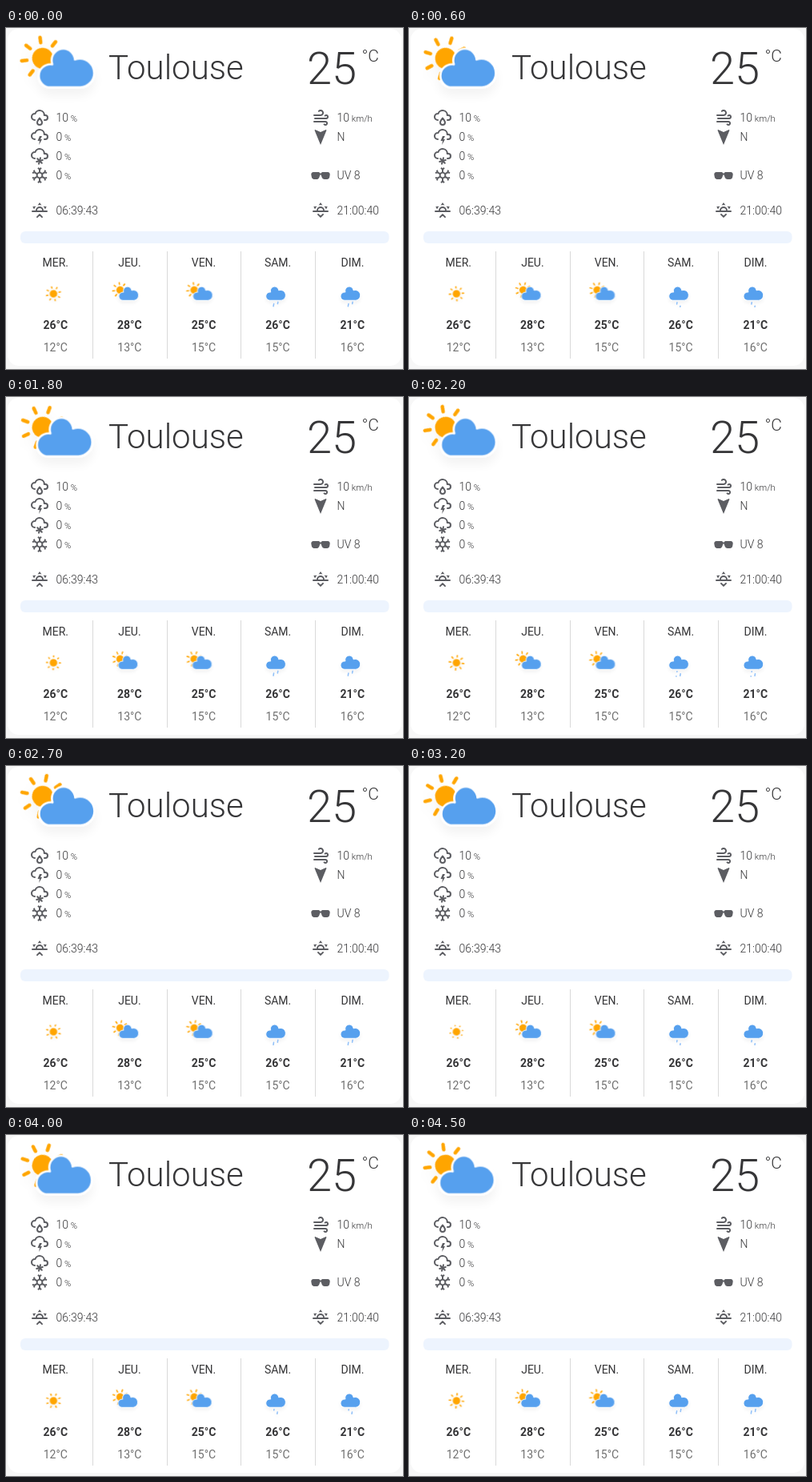
Recreate the animation shown at these times as an HTML page. Size 496x426 px, loop 4600 ms.

```html
<!DOCTYPE html>
<html lang="fr">
<head>
<meta charset="utf-8">
<title>Météo</title>
<style>
html, body { margin: 0; width: 100%; height: 100%; overflow: hidden; background: #f7f7f7; }
svg { display: block; }
text { font-family: Roboto, "Open Sans", sans-serif; font-size: 14px; font-weight: 300; fill: #363638; }
.unit { font-size: 11.2px; }
.city { font-size: 42px; }
.now { font-size: 56px; }
.deg { font-size: 21px; }
.mid { text-anchor: middle; }
.end { text-anchor: end; }
.day { font-weight: 400; }
.high { font-weight: 700; }
.low { font-weight: 400; fill: #707070; }
.fill { fill: #5c5d62; }
.line { fill: none; stroke: #5c5d62; stroke-width: 2; stroke-linecap: round; stroke-linejoin: round; }
.butt { stroke-linecap: butt; stroke-linejoin: miter; }
.ray { stroke: orange; stroke-width: 2; stroke-linecap: round; }
.rain { stroke: #91c0f8; stroke-width: 2; stroke-linecap: round; stroke-dasharray: 4 7; }
</style>
</head>
<body>
<svg id="stage" width="496" height="426" viewBox="0 0 496 426">
  <defs>
    <filter id="soft" width="200%" height="200%">
      <feGaussianBlur in="SourceAlpha" stdDeviation="3"/>
      <feOffset dy="4"/>
      <feComponentTransfer><feFuncA type="linear" slope="0.05"/></feComponentTransfer>
      <feMerge><feMergeNode/><feMergeNode in="SourceGraphic"/></feMerge>
    </filter>
  </defs>
  <rect x="2" y="1" width="492" height="421" rx="14" fill="#fff"/>
  <rect x="18" y="254" width="460.5" height="15" rx="6" fill="#edf4fe"/>
</svg>
<script>
const LOOP = 4600, STEP = 100;
const CLOCK = 43700; // how long the icons have already been running at the loop start
const stage = document.getElementById('stage');
const add = markup => stage.insertAdjacentHTML('beforeend', markup);
const text = (x, y, str, cls = '') => add(`<text x="${x}" y="${y}" class="${cls}">${str}</text>`);

// Line icons on a 24px grid
const line = (d, cls = '') => `<path class="line ${cls}" d="${d}"/>`;
const fill = d => `<path class="fill" fill-rule="evenodd" d="${d}"/>`;
const spin = (part, cx, cy) => Array.from({ length: 6 }, (_, i) =>
  `<g transform="rotate(${i * 60} ${cx} ${cy})">${part}</g>`).join('');

const outline = line('M6 15a4 4 0 0 1 0-8h.5A5.8 5.8 0 0 1 17.8 9H19a3 3 0 0 1 0 6h-1');
const horizon = fill('M3 12H7A5 5 0 0 1 17 12H21A1 1 0 0 1 21 14H3A1 1 0 0 1 3 12M15 12A3 3 0 0 0 9 12H15' +
  'M12 2L14.4 5.4Q12 4.6 9.6 5.4ZM3.3 7L7.5 6.65Q5.5 8.4 5.1 10.8ZM20.7 7L18.9 10.8Q18.5 8.4 16.5 6.65Z');

const glyphs = {
  rain: outline + line('M12 12.6C10.5 14.4 9 16.6 9 18a3 3 0 0 0 6 0C15 16.6 13.5 14.4 12 12.6Z'),
  bolt: outline + fill('M12 11H15L13 15H15L11.25 22L12 17H9.5Z'),
  snow: outline + spin(line('M12 18L13 14.2'), 12, 18),
  flake: spin(line('M10 2.7L12 4.7L14 2.7M12 4.7V8.25L15.25 10.12', 'butt'), 12, 12),
  wind: line('M4 9h8a3 3 0 1 0-2.1-5.1M5 13h14a2 2 0 1 0-1.4-3.4M4 17h14a2 2 0 1 1-1.4 3.4'),
  arrow: fill('M12 22L4.5 3.7L5.2 3L12 6L18.8 3L19.5 3.7Z'),
  glasses: fill('M7 17H4C2.4 17 1 15.7.8 14.1L.3 11.2C0 9.4 1.3 8 3 8H9C10.2 8 11 8.6 11.35 9.45' +
    'Q12 9.3 12.65 9.45C13 8.6 13.8 8 15 8H21C22.7 8 24 9.4 23.7 11.2L23.2 14.2' +
    'C23 15.7 21.6 17 20 17H17C15.4 17 13.9 15.8 13.5 14.3L12.65 11.6Q12 11.2 11.35 11.6L10.4 14.4C10 15.8 8.6 17 7 17Z'),
  rise: horizon + line('M9 20.1L12 17.1L15 20.1'),
  set: horizon + line('M9 16.9L12 19.9L15 16.9')
};
const glyph = (x, cy, name) => add(`<g transform="translate(${x} ${cy - 12})">${glyphs[name]}</g>`);

// Weather icons on a 64px grid
const rays = Array.from({ length: 8 }, (_, i) =>
  `<line class="ray" y1="9" y2="12" transform="rotate(${i * 45})"/>`).join('');
const sun = cls => `<g class="${cls}">${rays}<circle r="6" fill="orange"/></g>`;
const cloud = `<path transform="translate(0 -1)" fill="#57a0ee" stroke="#fff" stroke-width="1.2" stroke-linejoin="round"
  d="M47.7 35.4c0-4.6-3.7-8.2-8.2-8.2c-1 0-1.9.2-2.8.5c-.3-3.4-3.1-6.2-6.6-6.2c-3.7 0-6.7 3-6.7 6.7
  c0 .8.2 1.6.4 2.3c-.3-.1-.7-.1-1-.1c-3.7 0-6.7 2.9-6.7 6.6c0 3.6 2.9 6.6 6.5 6.6l17.2 0C44.2 43.3 47.7 39.8 47.7 35.4z"/>`;
const drop = (x, y, cls) => `<line class="rain ${cls}" transform="translate(${x} ${y})" y2="8"/>`;

const weather = {
  clear: `<g transform="translate(32 32)">${sun('shiny')}</g>`,
  cloudy: `<g transform="translate(20 26)">${sun('steady')}</g><g class="drift">${cloud}</g>`,
  rainy: `${cloud}<g transform="translate(35.3 46) rotate(10)">${drop(-6, 1, 'early')}${drop(0, -1, 'late')}</g>`
};
const icon = (x, y, size, name) =>
  add(`<g transform="translate(${x} ${y}) scale(${size / 64})"><g filter="url(#soft)">${weather[name]}</g></g>`);

// Current conditions
icon(2, -19, 140, 'cloudy');
text(128, 64, 'Toulouse', 'city');
text(438, 70, '25', 'now end');
text(466, 42, '°C', 'deg end');

const unit = (n, u) => `${n}<tspan class="unit"> ${u}</tspan>`;
[
  [112, 'rain', unit(10, '%'), 'wind', unit(10, 'km/h')],
  [136, 'bolt', unit(0, '%'), 'arrow', 'N'],
  [160, 'snow', unit(0, '%')],
  [184, 'flake', unit(0, '%'), 'glasses', 'UV 8'],
  [228, 'rise', '06:39:43', 'set', '21:00:40']
].forEach(([cy, left, a, right, b]) => {
  glyph(30, cy, left);
  text(62.5, cy + 5, a);
  if (!right) return;
  glyph(381, cy, right);
  text(413.5, cy + 5, b);
});

// Forecast
[
  ['MER.', 'clear', 26, 12],
  ['JEU.', 'cloudy', 28, 13],
  ['VEN.', 'cloudy', 25, 15],
  ['SAM.', 'rainy', 26, 15],
  ['DIM.', 'rainy', 21, 16]
].forEach(([day, kind, high, low], i) => {
  const mid = 61.8 + i * 92.6 + (i === 4 ? 0.7 : 0);
  text(mid, 298, day, 'mid day');
  icon(mid - 27.5, 307, 50, kind);
  text(mid, 376, high + '°C', 'mid high');
  text(mid, 404, low + '°C', 'mid low');
  if (i < 4) add(`<rect x="${Math.floor(108.5 + i * 92.6)}" y="279" width="1" height="134" fill="#d9d9d9"/>`);
});

// Paused animations, placed by the clock
const motions = [];
function move(sel, frames, timing) {
  for (const el of stage.querySelectorAll(sel)) {
    const motion = el.animate(frames, { iterations: Infinity, ...timing });
    motion.pause();
    motions.push(motion);
  }
}
const turn = { transform: ['rotate(0deg)', 'rotate(360deg)'] };
const fall = { strokeDashoffset: ['0px', '-100px'] };
move('.steady', turn, { duration: 9000 });
move('.shiny', turn, { duration: 9000, easing: 'ease-in-out' });
move('.shiny .ray', {
  strokeDasharray: ['3px 10px', '0.1px 10px', '3px 10px'],
  strokeDashoffset: ['0px', '-1px', '0px']
}, { duration: 2000 });
move('.drift', { transform: ['translate(0px)', 'translate(2px)', 'translate(0px)'] }, { duration: 3000 });
move('.early', fall, { duration: 8000 });
move('.late', fall, { duration: 8000, delay: 250 });

const start = performance.now();
function tick() {
  const ms = (performance.now() - start) % LOOP;
  const t = CLOCK + Math.floor(ms / STEP) * STEP;
  motions.forEach(motion => { motion.currentTime = t; });
  requestAnimationFrame(tick);
}
tick();
</script>
</body>
</html>
```
